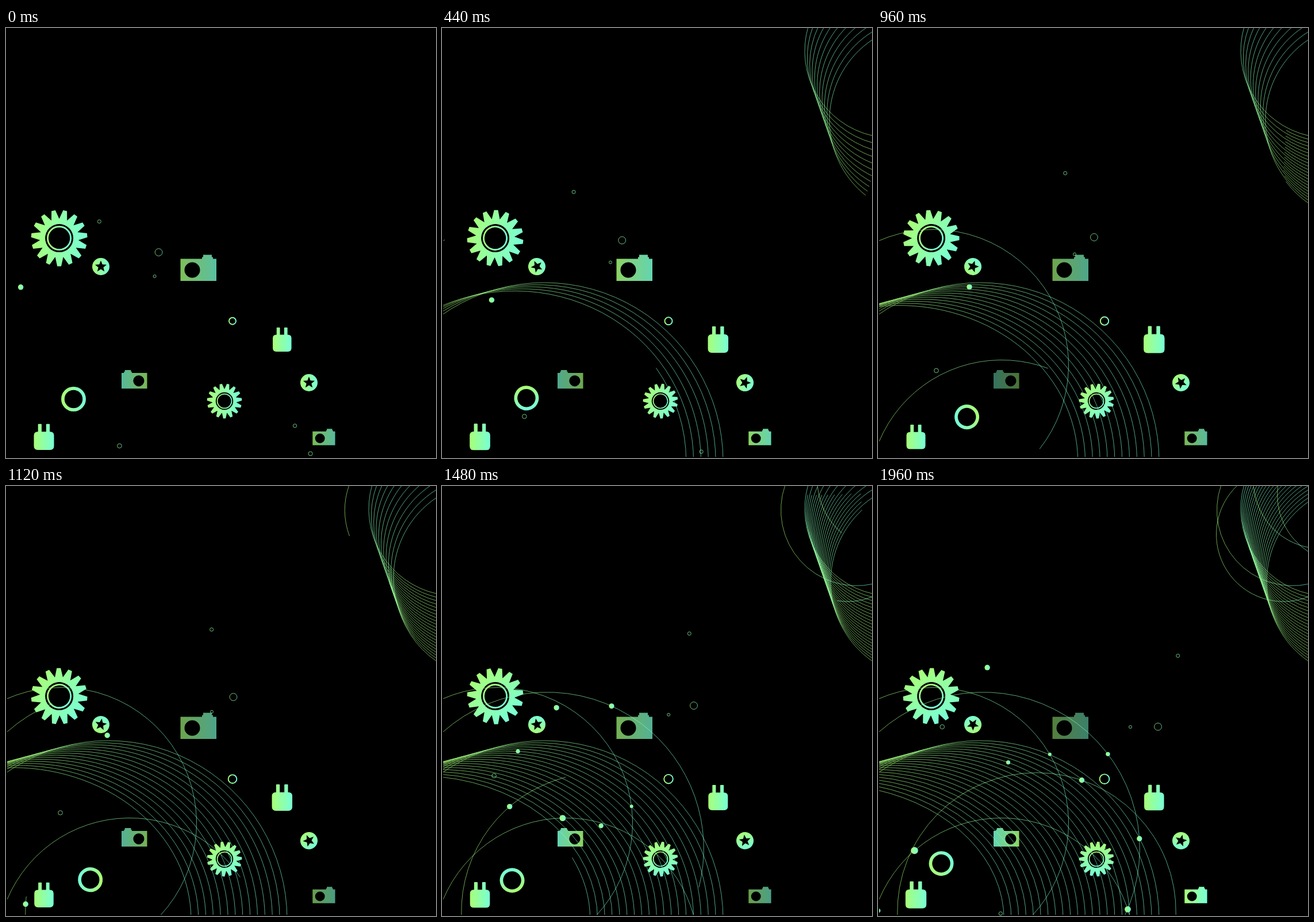
Write an HTML page that moves like this. It is 748 by 748 pixels and loops after 2000 ms.

```html
<!DOCTYPE html>
<html lang="en">
<head>
<meta charset="utf-8">
<title>Gears and orbits</title>
<style>
html, body { margin: 0; width: 100%; height: 100%; overflow: hidden; background: #000; }
svg { display: block; width: 100vw; height: 100vh; }
</style>
</head>
<body>
<svg id="stage" viewBox="0 0 748 748">
  <defs>
    <linearGradient id="mint"><stop stop-color="#a8ff78"/><stop offset="1" stop-color="#78ffd6"/></linearGradient>
    <linearGradient id="rise" x1="0" y1="1" x2="0" y2="0"><stop stop-color="#a8ff78"/><stop offset="1" stop-color="#78ffd6"/></linearGradient>
    <clipPath id="crop"><rect x="2" width="746" height="746"/></clipPath>
  </defs>
  <g id="lines" clip-path="url(#crop)" fill="none" stroke-width=".75"></g>
  <g id="dots" clip-path="url(#crop)" fill="url(#mint)"></g>
  <g id="things" fill="url(#mint)"></g>
</svg>
<script>
const LOOP = 2000, STEP = 40;
const RAD = Math.PI / 180;
const [lines, dots, things] = ['lines', 'dots', 'things'].map(id => document.getElementById(id));
const updates = [];

function add(parent, tag, attrs) {
  const el = document.createElementNS('http://www.w3.org/2000/svg', tag);
  for (const k in attrs) el.setAttribute(k, attrs[k]);
  return parent.appendChild(el);
}
const set = (el, k, v) => el.setAttribute(k, v);
const clamp = (v, lo = 0, hi = 1) => Math.min(hi, Math.max(lo, v));
const polar = (cx, cy, r, a, ry = r) => [cx + r * Math.cos(a * RAD), cy + ry * Math.sin(a * RAD)];
const easeInOut = u => u < .5 ? 2 * u * u : 1 - 2 * (1 - u) ** 2;
const easeIn = u => 1 - Math.cos(u * Math.PI / 2);

// Linear interpolation through values at the given times, held at both ends
function track(times, values, t) {
  let i = 1;
  while (i < times.length - 1 && t > times[i]) i++;
  const u = clamp((t - times[i - 1]) / (times[i] - times[i - 1]));
  return values[i - 1] + (values[i] - values[i - 1]) * u;
}
const BEATS = [0, .44, .64, .96, 1.28, 1.64, 1.96];

// ---- Lines that draw themselves ----
function arcPath(cx, cy, rx, ry, from, to) {
  const large = +(Math.abs(to - from) > 180), sweep = +(to > from);
  return `M${polar(cx, cy, rx, from, ry)}A${rx} ${ry} 0 ${large} ${sweep} ${polar(cx, cy, rx, to, ry)}`;
}
function drawnLine(d, progress, paint = 'mint') {
  const el = add(lines, 'path', { d, pathLength: 1, stroke: `url(#${paint})`, 'stroke-opacity': .85 });
  updates.push(t => {
    const f = clamp(progress(t));
    set(el, 'visibility', f > 0 ? 'visible' : 'hidden');
    set(el, 'stroke-dasharray', f < 1 ? `${f} 2` : 'none');
  });
}
const timed = (start, length, ease = easeInOut) => t => ease(clamp((t - start) / length));
const circleLine = (cx, cy, r, from, to, progress, paint) =>
  drawnLine(arcPath(cx, cy, r, r, from, to), progress, paint);

// Lower left fan: one line every 80 ms
for (let i = 0; i < 22; i++) {
  const cx = 178 - 12.85 * i, ry = 311 - 3.6 * i;
  const end = -Math.acos((-2 - cx) / 311) / RAD;
  drawnLine(arcPath(cx, 754, 311, ry, 0, end), timed(.08 * i, .08, easeIn));
}

// Upper right fan: one set drawn downwards, a second one between it drawn upwards
function fanLine(k, upwards) {
  const cx = 782 + 6 * k, cy = 40 + 12 * k, r = 151 + 1.7 * k;
  const edge = Math.acos((cx - 749) / r) / RAD;
  const low = 180 - edge;
  const high = 180 + Math.min(edge, Math.asin(Math.min(1, (cy + 2) / r)) / RAD);
  if (upwards) circleLine(cx, cy, r, low, high, timed(.67, 1), 'rise');
  else circleLine(cx, cy, r, high, low, timed(.01 * k, .4), 'rise');
}
for (let k = 0; k <= 10; k++) {
  fanLine(k, false);
  fanLine(k + .5, true);
}

// Single orbits
const orbitA = [95.5, 586.5, 236], orbitB = [215, 808.5, 231];
const orbitC = [183, 631, 272.3], orbitD = [276, 741, 242.3];
circleLine(...orbitA, -113.8, 43, timed(.4, .64));
circleLine(...orbitB, -157.2, -15.5, timed(.47, .87));
circleLine(...orbitC, -131.7, 25.3, timed(.96, .64));
circleLine(...orbitD, -181.2, 1.2, t => track([1.08, 1.28, 1.64, 1.94], [0, .209, .589, 1], t));
circleLine(721, 42, 131.5, 199, 77, timed(.96, .4));
circleLine(705.5, 84, 117, 68, 227, timed(1.28, .64));
circleLine(771, -9, 118, 175, 100, timed(1.28, .36));
circleLine(812.8, 15, 118.3, 188, 122, timed(1.64, .32));

// ---- Filled dots riding on the lines ----
function rider([cx, cy, rx, ry = rx], r, times, angles) {
  const el = add(dots, 'circle', { r });
  updates.push(t => {
    const [x, y] = polar(cx, cy, rx, track(times, angles, t), ry);
    set(el, 'cx', x);
    set(el, 'cy', y);
    set(el, 'visibility', t > times[0] ? 'visible' : 'hidden');
  });
}
const late = [1.2, 1.28, 1.64, 1.96];
rider(orbitA, 3, late, [43, 16.5, -26, -30.5]);
rider([114, 754, 311, 293], 3.6, late, [-111, -97.9, -77.7, -68.8]);
rider(orbitB, 5.4, late, [-160, -137, -54.7, -18.2]);
rider(orbitD, 4.7, [1.08, ...late.slice(1)], [-182, -155.8, -110.8, -71.1]);
rider(orbitC, 4.6, late, [-134, -117.6, -24.2, -3.7]);
rider(orbitC, 3.7, [1.5, 1.64, 1.96], [26, 9.3, -37.2]);
rider([215, 808.5, 226], 4.2, [1.29, 1.64, 1.9], [-12, -126.5, -162]);
rider(orbitB, 6.2, [1.58, 1.64, 1.96], [-160, -155.5, -131]);
rider([92, 364, 109.3], 4.7, [-1e-3, 2], [127.5, -29.3]);

// ---- Hollow circles sweeping clockwise together ----
function sweeper(cx, cy, orbit, start, r) {
  const el = add(things, 'circle', { r, fill: 'none', stroke: 'url(#mint)', 'stroke-width': .75 });
  updates.push(t => {
    const [x, y] = polar(cx, cy, orbit, start + 38.3 * t + 1.05 * t * t);
    set(el, 'cx', x);
    set(el, 'cy', y);
  });
}
sweeper(367, 533.5, 284, -136.1, 3);
sweeper(359, 538.5, 175.3, -122.2, 6.4);
sweeper(356.5, 534.7, 142, -133.6, 2.5);
sweeper(341, 521, 251, 124.9, 3.8);
sweeper(326.6, 542.7, 230.7, 40.3, 3.1);
sweeper(340, 535, 279.5, 47.3, 3.6);

// ---- Objects ----
const hole = r => `M${r} 0A${r} ${r} 0 1 0 ${-r} 0A${r} ${r} 0 1 0 ${r} 0Z`;
const polygon = pts => 'M' + pts.join('L') + 'Z';
const spin = (el, x, y, speed) =>
  updates.push(t => set(el, 'transform', `translate(${x} ${y}) rotate(${speed * t})`));

function gear(x, y, size, speed) {
  const g = add(things, 'g');
  const teeth = [];
  for (let i = 0; i < 15; i++) {
    const a = 90 + i * 24;
    teeth.push(polar(0, 0, 49 * size, a - 4), polar(0, 0, 49 * size, a + 4), polar(0, 0, 33.5 * size, a + 12));
  }
  add(g, 'path', { d: polygon(teeth) + hole(24.5 * size), 'fill-rule': 'evenodd' });
  add(g, 'circle', { r: 20.1 * size, fill: 'none', stroke: 'url(#mint)', 'stroke-width': 2.8 * size });
  spin(g, x, y, speed);
}
gear(92.6, 365.6, 1, 31.2);
gear(380, 649, .62, 46);

function badge(x, y, speed) {
  const star = [];
  for (let i = 0; i < 10; i++) star.push(polar(0, 0, i % 2 ? 4.6 : 10.6, i * 36 - 90));
  spin(add(things, 'path', { d: hole(15) + polygon(star), 'fill-rule': 'evenodd' }), x, y, speed);
}
badge(165, 415, -56);
badge(527, 617, 44);

function camera(x, y, sx, sy, opacities) {
  const body = 'M0 7H37.5V4H39.5V0H54.5V4H56.5V7H62.5V45.5H0Z';
  const lens = 'M34 26.5A13.5 13.5 0 1 0 7 26.5A13.5 13.5 0 1 0 34 26.5Z';
  const el = add(things, 'path', {
    d: body + lens, 'fill-rule': 'evenodd', transform: `translate(${x} ${y}) scale(${sx} ${sy})`
  });
  updates.push(t => set(el, 'opacity', track(BEATS, opacities, t)));
}
camera(303.5, 394.5, 1, 1, [.75, .83, .83, .65, .64, .74, .5]);
camera(245.5, 595, -.712, .71, [.72, .66, .66, .45, .95, .73, .83]);
camera(533.3, 697.3, .628, .625, [.73, .83, .65, .73, .5, .73, 1]);

function plug(x, y, widths) {
  const g = add(things, 'g');
  add(g, 'path', {
    d: 'M-10.7 -9.5V-22.5q0 -1 1 -1h4.5q1 0 1 1V-9.5H4V-22.5q0 -1 1 -1h4.5q1 0 1 1V-9.5' +
       'H11.2q7 0 7 7V16.5q0 7 -7 7H-11.2q-7 0 -7 -7V-2.5q0 -7 7 -7Z'
  });
  updates.push(t => set(g, 'transform', `translate(${x} ${y}) scale(${track(BEATS, widths, t) / 36.4})`));
}
plug(480.3, 542, [32.5, 35.5, 36.4, 36.4, 34.5, 33.5, 34.5]);
plug(66, 711.3, [35, 35.6, 34, 33, 34, 35, 36.4]);

// Big ring turning about an off-centre pivot
const ring = add(things, 'circle', {
  cx: -15.9, cy: -18.7, r: 18.6, fill: 'none', stroke: 'url(#mint)', 'stroke-width': 5.7
});
spin(ring, 133.4, 664.2, 167.5);

// Small growing ring
const bubble = add(things, 'circle', { cx: 394, cy: 509.7, fill: 'none', stroke: 'url(#mint)', 'stroke-width': 1.9 });
updates.push(t => set(bubble, 'r', 6 + 1.2 * t));

function render() {
  const ms = performance.now() % LOOP;
  const t = Math.floor(ms / STEP) * STEP / 1000;
  for (const update of updates) update(t);
  requestAnimationFrame(render);
}
render();
</script>
</body>
</html>
```
